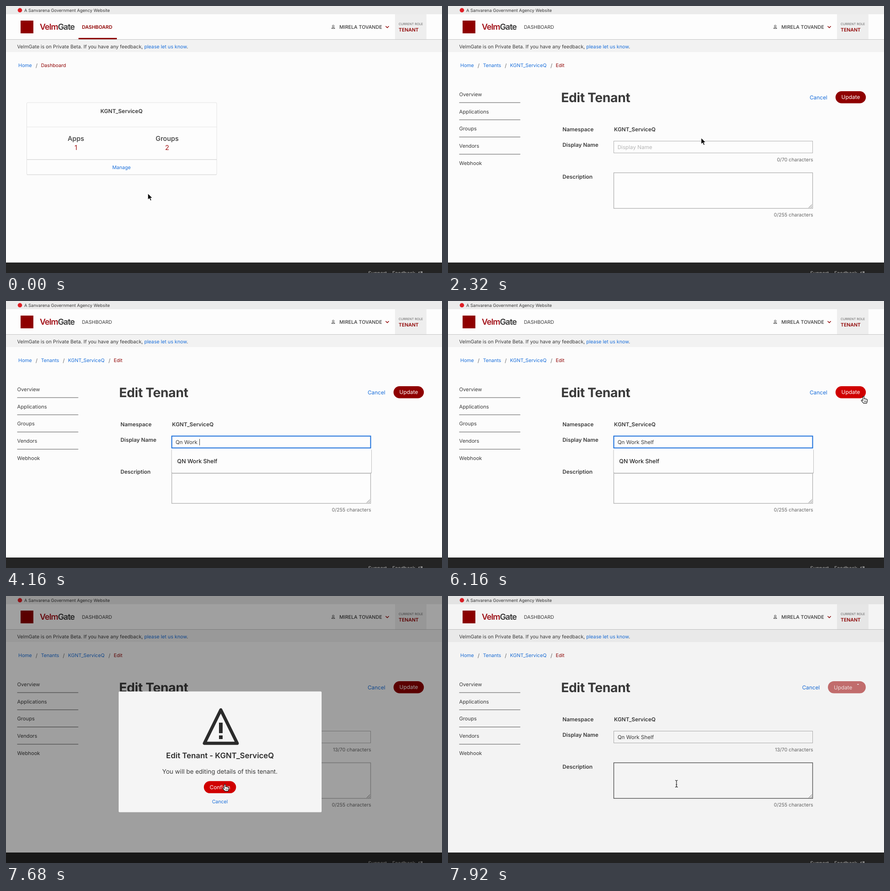
These frames come from a looping animation (956 by 586 pixels, 8000 ms). An HTML page:

```html
<!DOCTYPE html>
<html lang="en">
<head>
<meta charset="utf-8">
<title>Edit tenant</title>
<style>
  html, body { margin: 0; height: 100%; overflow: hidden; background: #fcfcfc; }
  svg { display: block; width: 956px; height: 586px; }
  text { font-family: Inter, sans-serif; font-optical-sizing: none; text-rendering: geometricPrecision; white-space: pre; }
  .shadow { filter: blur(7px); }
</style>
</head>
<body>
<svg id="stage" viewBox="0 0 956 586"></svg>
<script>
const LOOP = 8000, STEP = 80;
const RED = '#8f0000', BRIGHT = '#d00000', BLUE = '#1a6fdb', INK = '#3a3a3a', GREY = '#666';
const TENANT = 'KGNT_ServiceQ', ENTRY = 'Qn Work Shelf';
const SUGGESTIONS = ['QN Work Shelf', 'Quay Builders (test env)', 'Display Name', 'TRLO', 'QUAY-NETS (old no)', '(Display Name)'];

// Moments at which the interface changes state
const AT = { overview: 960, edit: 1920, focus: 2560, type: 2960, typed: 5160, dialog: 6720, confirm: 7720 };

// Pointer: time, x, y, shape used until the next entry
const POINTER = [
  [0, 311, 411, 'arrow'], [80, 311, 411, 'arrow'], [480, 256, 350, 'hand'], [960, 256, 350, 'arrow'],
  [1280, 518, 343, 'arrow'], [1440, 790, 308, 'arrow'], [1600, 886, 199, 'hand'], [1920, 886, 199, 'arrow'],
  [2000, 817, 240, 'arrow'], [2080, 724, 265, 'arrow'], [2240, 585, 283, 'arrow'], [2320, 555, 289, 'arrow'],
  [2480, 560, 308, 'beam'], [2880, 560, 308, 'none'], [5440, 575, 296, 'beam'], [5600, 640, 268, 'arrow'],
  [5680, 720, 257, 'arrow'], [5760, 780, 252, 'arrow'], [5840, 863, 241, 'arrow'], [5920, 925, 214, 'arrow'],
  [6080, 911, 209, 'hand'], [6480, 911, 209, 'hand'], [6720, 905, 203, 'arrow'], [7040, 905, 203, 'arrow'],
  [7440, 480, 413, 'hand'], [7680, 480, 413, 'hand'], [7760, 492, 412, 'beam'], [7840, 501, 412, 'beam'], [8000, 501, 412, 'beam']
];

const SHAPES = {
  none: '',
  arrow: '<path d="M0 0V14.5L3.4 11.4 5.7 16.6 8.2 15.5 6 10.5H10.4Z" fill="#000" stroke="#fff" stroke-width="1.1"/>',
  hand: `<path d="M-1.4 1.2Q0-.9 1.4 1.2V5.8Q3.2 4.8 4.2 6.2 5.8 5.4 6.7 6.9 8.6 6.6 8.6 8.6V11L7 15.4H.2L-4.8 9.8Q-4.8 7.6-2.8 8.2L-1.4 9.6Z"
    fill="#fff" stroke="#111" stroke-width="1.1"/><path d="M2 9.5V13M4 9.5V13M6 9.5V13" stroke="#111" stroke-width=".8"/>`,
  beam: '<path d="M-3-7.5Q0-7.5 0-5.5 0-7.5 3-7.5M0-5.5V5.5M-3 7.5Q0 7.5 0 5.5 0 7.5 3 7.5M-1.5 2H1.5" fill="none" stroke="#222" stroke-width="1.2"/>'
};

const clamp = v => Math.max(0, Math.min(1, v));
const text = (x, y, str, size = 10.65, fill = INK, weight = 400, more = '') =>
  `<text x="${x}" y="${y}" font-size="${size}" fill="${fill}" font-weight="${weight}" ${more}>${str}</text>`;
const middle = 'text-anchor="middle"', end = 'text-anchor="end"';
const rect = (x, y, w, h, fill, more = '') => `<rect x="${x}" y="${y}" width="${w}" height="${h}" fill="${fill}" ${more}/>`;
const line = (x1, x2, y, stroke, width = 1) => `<path d="M${x1} ${y}H${x2}" stroke="${stroke}" stroke-width="${width}"/>`;
const card = (x, y, w, h) =>
  rect(x, y + 1, w, h, '#d6d6d6', 'rx="2"') + rect(x, y, w, h, '#fdfdfd', 'rx="2" stroke="#e2e2e2"');
const field = (y, h, stroke, width) => rect(363.5, y, 436, h, '#fdfdfd', `stroke="${stroke}" stroke-width="${width}"`);
const pill = (x, y, w, h, label, fill) =>
  rect(x, y, w, h, fill, `rx="${h / 2}"`) + text(x + w / 2, y + h / 2 + 4.2, label, 11.9, '#fff', 400, middle);

function header(onDashboard) {
  return rect(0, 0, 956, 18, '#ebebeb') + '<circle cx="30.5" cy="9.3" r="4.8" fill="#e01f26"/>' +
    text(40, 13, 'A Sanvarena Government Agency Website', 9.4) +
    rect(0, 18, 956, 55, '#fdfdfd') + rect(32, 32, 28, 28, RED) +
    text(74, 52, `<tspan fill="#a3131a">Velm</tspan>Gate`, 18, INK, 600, 'letter-spacing="-1"') +
    (onDashboard
      ? text(166.5, 50, 'DASHBOARD', 10.6, RED, 600) + rect(159, 70, 84, 3.5, RED)
      : text(166.5, 50, 'DASHBOARD')) +
    `<g fill="none" stroke="#444"><circle cx="717.5" cy="44" r="2"/><path d="M714 49.5Q714 47 717.5 47T721 49.5Z"/></g>` +
    text(731, 50, 'MIRELA TOVANDE', 10.7, INK, 500) +
    `<path d="M832.5 44.2L836 47.8 839.5 44.2" fill="none" stroke="${RED}" stroke-width="1.4"/>` +
    rect(853, 18, 69, 55, '#eee') + text(861, 42, 'CURRENT ROLE', 7, GREY) + text(861, 55.8, 'TENANT', 10.5, RED, 600) +
    rect(0, 74, 956, 27, '#f2f2f2') + line(0, 956, 73.5, '#c4c4c4') +
    text(24.5, 92.6, `VelmGate is on Private Beta. If you have any feedback, <tspan fill="${BLUE}">please let us know</tspan>.`, 10.7);
}

function breadcrumb(names) {
  const xs = [27, 76.7, 136, 236.3];
  return names.map((name, i) => {
    const last = i === names.length - 1;
    return text(xs[i], 134.4, name, 10.65, last ? RED : BLUE) +
      (last ? '' : text(xs[i + 1] - 11.6, 134.8, '/', 11.5, GREY));
  }).join('');
}

const sidebar = () => ['Overview', 'Applications', 'Groups', 'Vendors', 'Webhook'].map((name, i) =>
  text(24.5, 197.8 + i * 37.75, name, 11.2) + (i < 4 ? line(24.5, 158.5, 212 + i * 37.75, '#555') : '')).join('');

const dashboard = () => breadcrumb(['Home', 'Dashboard']) + card(45.5, 212, 416.5, 158) +
  text(253.3, 235.2, TENANT, 12, INK, 600, middle) + line(46, 462, 265.5, '#e6e6e6') + line(46, 462, 337, '#c8c8c8') +
  text(153.3, 296.2, 'Apps', 14.5, INK, 500, middle) + text(153.3, 316.2, '1', 14.7, '#a31515', 400, middle) +
  text(353.3, 296.2, 'Groups', 14.5, INK, 500, middle) + text(353.3, 316.2, '2', 14.7, '#a31515', 400, middle) +
  text(253.2, 357.8, 'Manage', 10.6, BLUE, 400, middle);

function overview() {
  const rows = [[259, 'Display Name', ''], [291, 'Description', ''], [322, 'Tenancy ID', '4c81d7e0-52ba-4f36-9d1e-7ab03c65e9f2'],
    [437.5, 'Tenant Admins', 'Mirela Tovande'], [453.5, '', 'Joren Yil']];
  return breadcrumb(['Home', 'Tenants', TENANT, 'Overview']) + sidebar() +
    card(250, 174.5, 665, 165) + card(250, 354.5, 665, 117) +
    text(264, 206, 'Information', 16, INK, 600) + text(264, 385, 'Users', 16, INK, 600) +
    text(890, 201, 'Edit', 11.8, BLUE, 400, middle) + text(890, 380, 'Edit', 11.8, BLUE, 400, middle) +
    line(264, 902, 225, '#ddd') + line(264, 902, 404, '#ddd') +
    rows.map(([y, label, value]) => text(264, y, label, 10.6, INK, 600) + text(372, y, value)).join('');
}

function suggestions(count) {
  const bottom = 341 + count * 36;
  return rect(362.5, 325, 439.5, bottom - 323, '#bdbdbd', 'rx="3"') + rect(363.5, 324, 437.5, bottom - 324, '#fdfdfd', 'rx="2"') +
    SUGGESTIONS.slice(0, count).map((name, i) => text(375.3, 355.6 + i * 35.8, name, 12.5, '#222', 500)).join('');
}

function editForm(t) {
  const typed = ENTRY.slice(0, Math.max(0, Math.floor((t - AT.type) / 160) + 1));
  const focused = t >= AT.focus && t < AT.dialog;
  const busy = t >= AT.confirm + 40;
  const hover = t >= 6000 && t < AT.dialog;
  const caretOn = focused && (t < AT.typed || Math.floor((t - AT.typed) / 500) % 2 === 1);
  const caret = caretOn ? '<tspan dx="-.5" fill="#222">|</tspan>' : '';
  const buttons = busy
    ? text(776.5, 204.7, 'Cancel', 11.8, BLUE) + rect(833, 187, 83, 26.5, '#c87070', 'rx="13.2"') +
      text(846, 204.7, 'Update', 11.8, '#f7e6e6') +
      `<path d="M897.5 194.2Q899 193.5 900.5 194.2" fill="none" stroke="#fff" stroke-width="1.5" transform="rotate(${(t - 7920) * .5} 899 200)"/>`
    : text(793, 204.7, 'Cancel', 11.8, BLUE) + pill(849.7, 187, 66.5, 26.5, 'Update', hover ? BRIGHT : RED);
  return breadcrumb(['Home', 'Tenants', TENANT, 'Edit']) + sidebar() +
    text(248, 211.4, 'Edit Tenant', 28.4, INK, 700, 'letter-spacing="-.4"') + buttons +
    text(251, 275.3, 'Namespace', 11.85, INK, 600) + text(364, 275.3, TENANT, 11.85, INK, 600) +
    text(251, 309, 'Display Name', 11.85, INK, 600) + text(251, 378.5, 'Description', 11.85, INK, 600) +
    (focused ? field(296.5, 26, BLUE, 2) : field(296.5, 26, '#b0b0b0', 1)) +
    text(371.7, 314, typed + caret || 'Display Name', 11.7, typed ? INK : '#b5b5b5') +
    text(800.5, 341, `${typed.length}/70 characters`, 10.6, GREY, 400, end) +
    (t >= 7800 ? field(366, 78.2, '#555', 1.4) : field(366, 78.2, '#b0b0b0', 1.3)) +
    '<path d="M791 443L798 436M795 443L798 440" stroke="#555" stroke-width=".9"/>' +
    text(800.5, 462, '0/255 characters', 10.6, GREY, 400, end) +
    (focused ? suggestions(typed.length === 0 ? 6 : typed.length === 1 ? 2 : 1) : '');
}

const footer = () => rect(0, 563, 956, 23, '#242424') + text(794, 590, 'Support', 10.9, '#aaa') + text(847, 590, 'Feedback', 10.9, '#aaa') +
  '<path d="M908 584H905V591H912V588M908.5 583H912.5V587M912.5 583L908 587.5" fill="none" stroke="#aaa" stroke-width="1.2"/>';

function dialog(t) {
  const shown = t < AT.confirm ? clamp((t - AT.dialog) / 320) : clamp(1 - (t - AT.confirm) / 220);
  if (!shown) return '';
  const scale = .873 + .127 * shown;
  // The shadow is only visible while the dialog is scaling
  const shadow = 1.6 * shown * (1 - shown);
  return rect(0, 0, 956, 586, '#000', `opacity="${.37 * shown}"`) +
    `<g opacity="${clamp(2.4 * shown - .32)}" transform="translate(469.5 342) scale(${scale}) translate(-469.5 -342)">` +
    rect(247, 213, 445, 265, '#000', `class="shadow" opacity="${shadow}"`) + rect(247, 209.5, 445, 265, '#f5f5f5', 'rx="2"') +
    '<path d="M471 250L435 323.3H507Z" fill="none" stroke="#2b2b2b" stroke-width="7" stroke-linejoin="round"/>' +
    rect(467, 278, 8, 23, '#2b2b2b') + rect(467, 306, 8, 8, '#2b2b2b') +
    text(469.3, 356.3, `Edit Tenant - ${TENANT}`, 16.8, '#2b2b2b', 600, middle) +
    text(469, 390.3, 'You will be editing details of this tenant.', 13.5, INK, 400, middle) +
    pill(433.8, 406.3, 70.6, 26.5, 'Confirm', t >= 7400 ? BRIGHT : '#990a0a') +
    text(469, 455, 'Cancel', 10.6, BLUE, 400, middle) + '</g>';
}

function pointer(t) {
  const i = POINTER.findIndex(key => key[0] > t) - 1;
  const [t0, x0, y0, shape] = POINTER[i], [t1, x1, y1] = POINTER[i + 1];
  const k = (t - t0) / (t1 - t0);
  return `<g transform="translate(${x0 + (x1 - x0) * k} ${y0 + (y1 - y0) * k})">${SHAPES[shape]}</g>`;
}

const stage = document.getElementById('stage');
let drawn = -1;
function frame() {
  const t = Math.floor(performance.now() % LOOP / STEP) * STEP;
  if (t !== drawn) {
    const page = t < AT.overview ? dashboard() : t < AT.edit ? overview() : editForm(t);
    stage.innerHTML = rect(0, 0, 956, 586, '#fcfcfc') + header(t < AT.overview) + page + footer() + dialog(t) + pointer(t);
    drawn = t;
  }
  requestAnimationFrame(frame);
}
frame();
</script>
</body>
</html>
```
